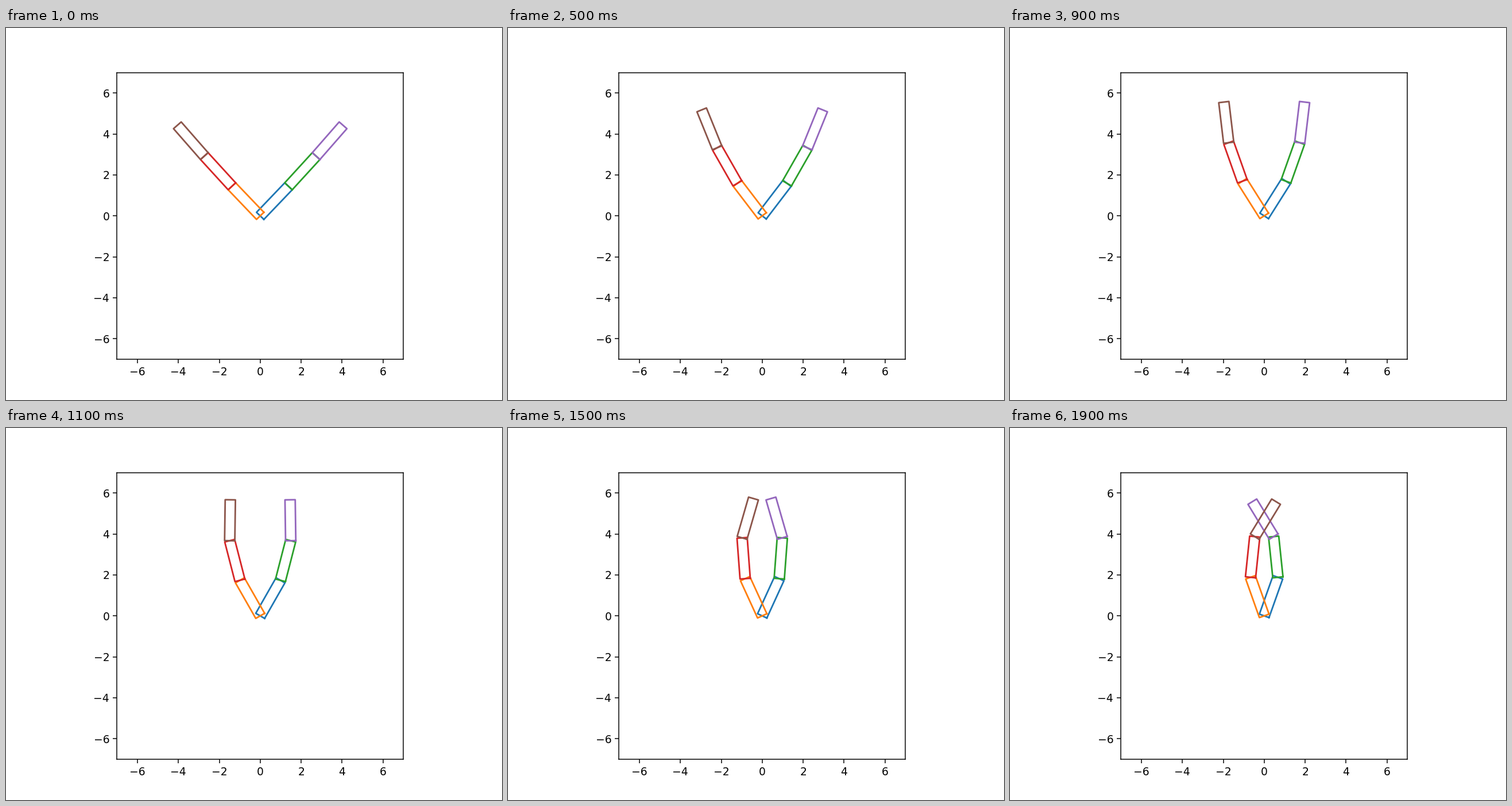
A matplotlib script that plays this animation: 864 px wide and 648 px high, repeating every 2000 ms.

```python
import numpy as np
import matplotlib.pyplot as plt
from matplotlib.animation import FuncAnimation

FRAMES = 20
LENGTH, WIDTH = 2.0, 0.5
START = np.pi / 4
STEP = 1 / 45  # bend added by each joint per frame, in radians

# Closed outline of one link, lying along +x from its base joint
LINK = np.array([
    [0, LENGTH, LENGTH, 0, 0],
    [-WIDTH / 2, -WIDTH / 2, WIDTH / 2, WIDTH / 2, -WIDTH / 2],
])

fig, ax = plt.subplots(figsize=(6.4, 4.8), dpi=135)
ax.set_xlim(-7, 7)
ax.set_ylim(-7, 7)
ax.set_aspect("equal")
ax.set_xticks(range(-6, 7, 2))
ax.set_yticks(range(-6, 7, 2))

# Links alternate right, left, going outwards from the palm
lines = [ax.plot([], [], color=f"C{i}", lw=1.5)[0] for i in range(6)]


def place(line, base, angle):
    """Draw a link at its base joint and return the next joint."""
    c, s = np.cos(angle), np.sin(angle)
    x, y = np.array([[c, -s], [s, c]]) @ LINK
    line.set_data(x + base[0], y + base[1])
    return base + LENGTH * np.array([c, s])


def update(frame):
    bend = STEP * (frame + 1)
    right = left = np.zeros(2)
    for n in range(3):
        angle = START + (n + 1) * bend
        right = place(lines[2 * n], right, angle)
        left = place(lines[2 * n + 1], left, np.pi - angle)
    return lines


anim = FuncAnimation(fig, update, frames=FRAMES, interval=100,
                     init_func=lambda: update(0), repeat=True)
plt.show()
```
